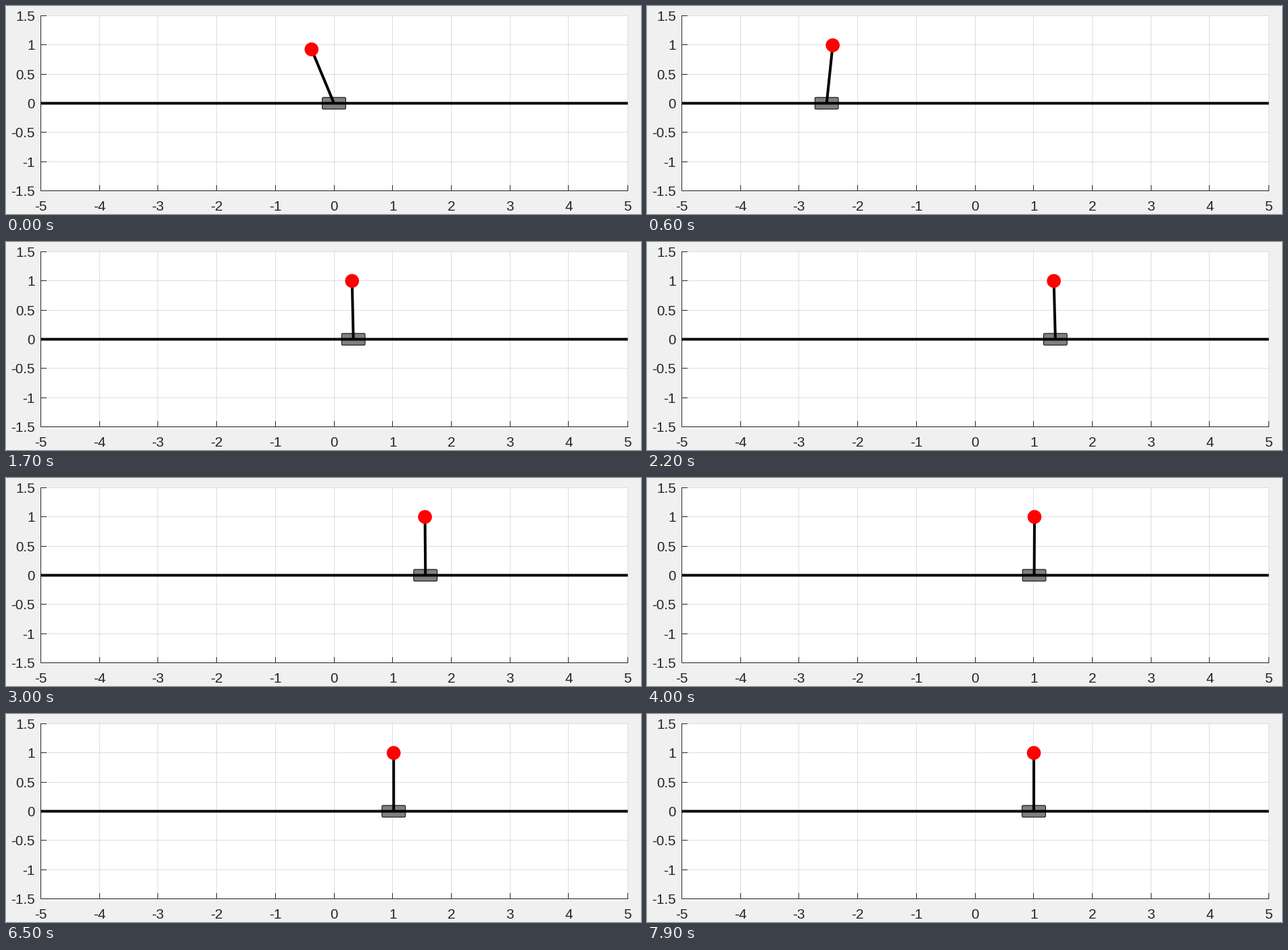
These frames come from a looping animation (939x309 px, 8 s). A matplotlib script:

```python
import numpy as np
import matplotlib.pyplot as plt
from matplotlib.animation import FuncAnimation
from matplotlib.patches import Circle, FancyBboxPatch, Rectangle

W, H, DPI = 939, 309, 100
FRAMES, INTERVAL = 80, 100
PX = 72 / DPI               # one pixel in points
INK = (0.15, 0.15, 0.15)
SCALE_X, SCALE_Y = 86.73, 260 / 3
LEFT, RIGHT, TOP, BOTTOM = 51.5, 919.5, 14.5, 274.5

plt.rcParams["font.family"] = "Liberation Sans"
fig = plt.figure(figsize=(W / DPI, H / DPI), dpi=DPI, facecolor="#f0f0f0")
ax = fig.add_axes([0, 0, 1, 1])
ax.set_xlim(0, W)
ax.set_ylim(H, 0)
ax.axis("off")


def px(x):
    return 485 + SCALE_X * x


def py(y):
    return 144.5 - SCALE_Y * y


def line(x0, y0, x1, y1, color="black", width=1, **kw):
    # Coordinates are already pixel centres, so snapping would shift them.
    return ax.plot([x0, x1], [y0, y1], color=color, lw=width * PX,
                   solid_capstyle="butt", snap=False, **kw)[0]


def label(x, y, value, ha):
    ax.text(x, y, f"{value:g}", color=INK, fontsize=20.8 * PX, ha=ha,
            va="baseline", zorder=3)


# Plot area, grid, ticks and labels
ax.add_patch(Rectangle((LEFT, TOP - 0.5), RIGHT + 0.5 - LEFT,
                       BOTTOM + 0.5 - TOP, fc="white", lw=0, snap=False,
                       zorder=0))

for v in range(-5, 6):
    x = np.floor(px(v)) + 0.5 if v < 5 else RIGHT
    line(x, TOP, x, BOTTOM, INK, alpha=0.15, zorder=1)
    line(x, BOTTOM, x, BOTTOM - 8.5, INK, zorder=2)
    label(px(v), 303.5, v, "center")

for v in np.arange(-3, 4) / 2:
    y = np.floor(py(v)) + 0.5
    line(LEFT, y, RIGHT, y, INK, alpha=0.15, zorder=1)
    line(LEFT, y, LEFT + 8.5, y, INK, zorder=2)
    label(42.7, y + 7.4, v, "right")

line(LEFT, TOP - 0.5, LEFT, BOTTOM + 0.5, INK, zorder=2)
line(LEFT, BOTTOM, RIGHT + 0.5, BOTTOM, INK, zorder=2)

# Cart, rail, pole and bob
CART_W, CART_H = 0.4 * SCALE_X, 0.2 * SCALE_Y
cart = FancyBboxPatch((0, py(0) - CART_H / 2), CART_W, CART_H,
                      boxstyle="round,pad=0,rounding_size=1.5",
                      fc=(0.5, 0.5, 0.5), ec="black", lw=PX, snap=False,
                      zorder=4)
ax.add_patch(cart)
line(LEFT, py(0), RIGHT, py(0), width=4, zorder=5)
pole = line(0, 0, 0, 0, width=4, zorder=6)
bob = ax.add_patch(Circle((0, 0), 10.3, fc="red", lw=0, zorder=7))

# Closed-loop response: a slow swing around the goal plus a fast transient
GOAL, TILT0, GRAVITY = 1.0, -np.pi / 8, 125.0
POLE_SLOW = -0.833 + 1.53j
AMP, T_CROSS = 1.315, 1.973


def slow(t, order=0):
    """Time derivative of the slow mode."""
    return (AMP * POLE_SLOW**order * np.exp(POLE_SLOW * (t - T_CROSS))).imag


def fast(t, value, rate, decay, freq):
    """Damped transient with the given start value and rate."""
    swing = (rate + decay * value) / freq
    return np.exp(-decay * t) * (value * np.cos(freq * t)
                                 + swing * np.sin(freq * t))


def cart_x(t):
    return GOAL + slow(t) + fast(t, -GOAL - slow(0), -slow(0, 1), 6.5, 4.0)


def tilt(t):
    rest = TILT0 - slow(0, 2) / GRAVITY
    return slow(t, 2) / GRAVITY + fast(t, rest, -slow(0, 3) / GRAVITY, 6.5, 6.9)


def draw(i):
    t = i * INTERVAL / 1000
    x, a = cart_x(t), tilt(t)
    tip = px(x + np.sin(a)), py(np.cos(a))
    cart.set_x(px(x) - CART_W / 2)
    pole.set_data([px(x), tip[0]], [py(0), tip[1]])
    bob.center = tip
    return cart, pole, bob


anim = FuncAnimation(fig, draw, frames=FRAMES, interval=INTERVAL,
                     repeat=True, repeat_delay=0, blit=False)
plt.show()
```
